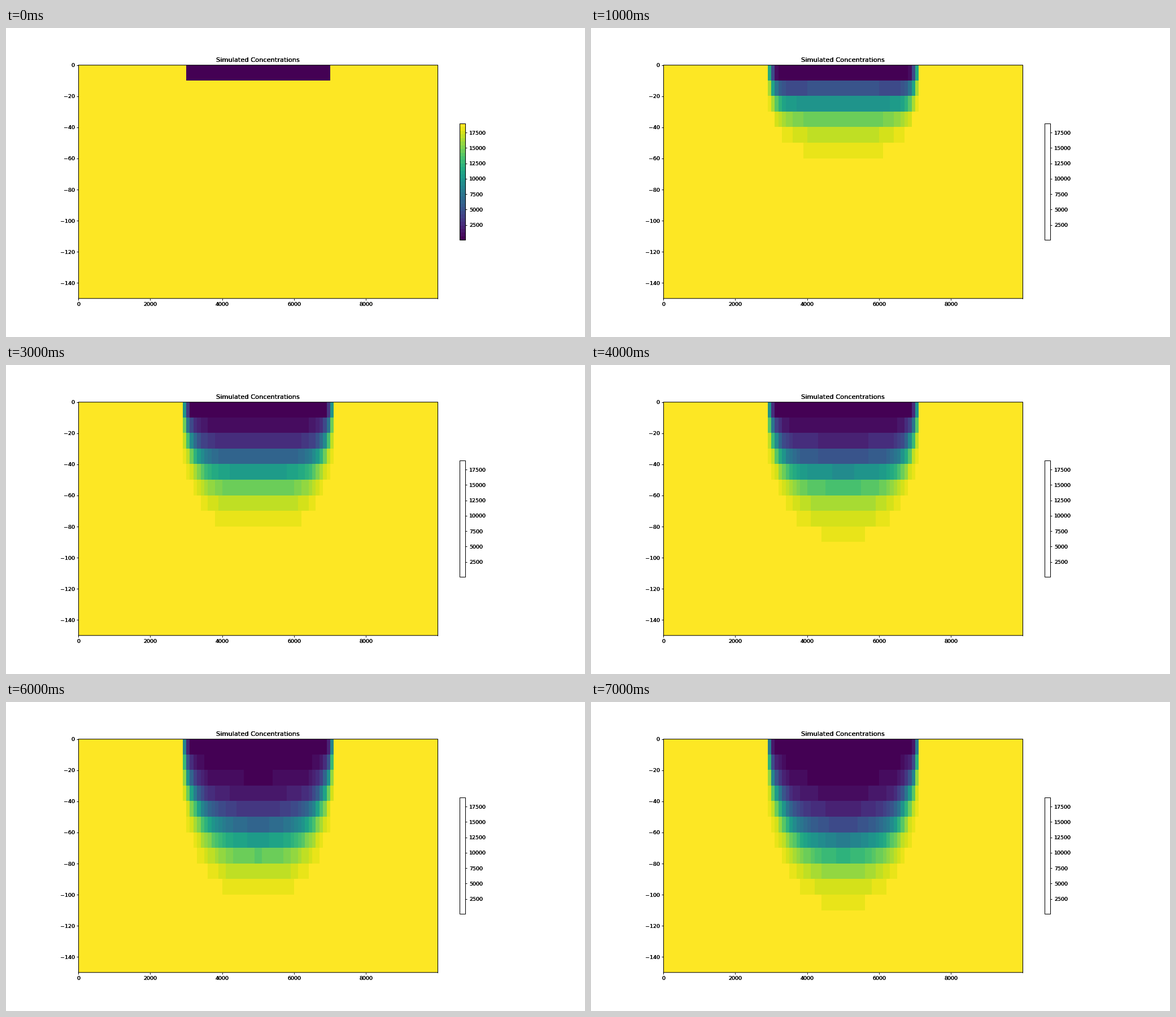
Recreate the animation shown at these times as a matplotlib script. Size 1025x547 px, loop 8000 ms.

```python
import numpy as np
import matplotlib.pyplot as plt
from matplotlib.animation import FuncAnimation

WIDTH, HEIGHT = 1025, 547
DPI = WIDTH / 15
ROWS, COLS = 15, 100
FRESH, SALT = 35, 19000
SHORE = 30  # first column that receives recharge

# Depth, in rows, of the middle of the lens after each step.
LENS_DEPTH = [0, 1.92, 2.05, 3.8, 4.02, 5.22, 5.85, 6.45]

plt.rcParams.update({
    "font.family": "DejaVu Sans",
    "axes.linewidth": 1.1,
    "xtick.major.width": 1,
    "ytick.major.width": 1,
})


def concentration(step):
    """Salt concentration on the grid: a lens of fresh water that sinks."""
    row = np.arange(ROWS)[:, None]
    col = np.arange(COLS)[None, :]
    inland = np.minimum(col, COLS - 1 - col) - SHORE
    if step == 0:
        return np.where((row == 0) & (inland >= 0), FRESH, SALT)

    # The lens deepens exponentially from the shore to its middle.
    middle = LENS_DEPTH[step]
    shore = .2 + .3 * middle
    rise = 1 - np.exp(-np.maximum(inland, 0) / (.83 * middle))
    interface = np.where(inland < 0, .14 * middle - .6,
                         shore + (middle - shore) * rise)

    # The mixing zone is sharpest at the shore and while the lens is thin.
    ramp = np.clip(inland / 11, 0, 1)
    slope = .9 + 1.3 / middle - ramp * (.1 + .7 / middle)
    slope = slope - .2 * (inland < 0)
    below = row - interface
    skew = ramp * (.06 - .009 * middle)
    logit = slope * below - skew * np.clip(below, -5, 5) ** 2
    logit = logit - 1.2 * ((row == 0) & (inland > 0))
    share = np.where(inland < -1, 1, 1 / (1 + np.exp(-logit)))
    return FRESH + (SALT - FRESH) * share


def embolden(text, passes=3):
    """Draw a text several times so its soft edges turn solid."""
    draw = text.draw

    def draw_repeatedly(renderer):
        for _ in range(passes):
            draw(renderer)

    text.draw = draw_repeatedly


def pixel_box(left, top, right, bottom):
    """Figure fractions of a box given in pixels from the top left."""
    return (left / WIDTH, 1 - bottom / HEIGHT,
            (right - left) / WIDTH, (bottom - top) / HEIGHT)


fig, ax = plt.subplots(
    figsize=((WIDTH + 1e-6) / DPI, (HEIGHT + 1e-6) / DPI),
    dpi=DPI, facecolor="white")
fig.subplots_adjust(left=.125, right=.9, bottom=.125, top=.88)

image = ax.imshow(
    concentration(0), extent=(0, 10000, -150, 0), aspect="auto",
    interpolation="nearest", cmap=plt.get_cmap("viridis").resampled(32),
    vmin=FRESH, vmax=SALT)
ax.set_title("Simulated Concentrations")
ax.set_xticks(range(0, 10000, 2000))
ax.set_yticks(range(0, -141, -20))
bar = fig.colorbar(image, ax=ax, shrink=.5, aspect=20.5)
bar.set_ticks(range(2500, 17501, 2500))

ax.set_position(pixel_box(128.2, 65.7, 764.4, 478.8))
for side in ("top", "bottom"):
    ax.spines[side].set_snap(False)

for label in (ax.title, *ax.get_xticklabels(), *ax.get_yticklabels(),
              *bar.ax.get_yticklabels()):
    embolden(label)


def update(step):
    image.set_data(concentration(step))
    bar.solids.set_visible(step == 0)  # the bar is filled only at the start
    return image, bar.solids


anim = FuncAnimation(fig, update, frames=8, interval=1000,
                     repeat=True, repeat_delay=0, blit=False)
plt.show()
```
